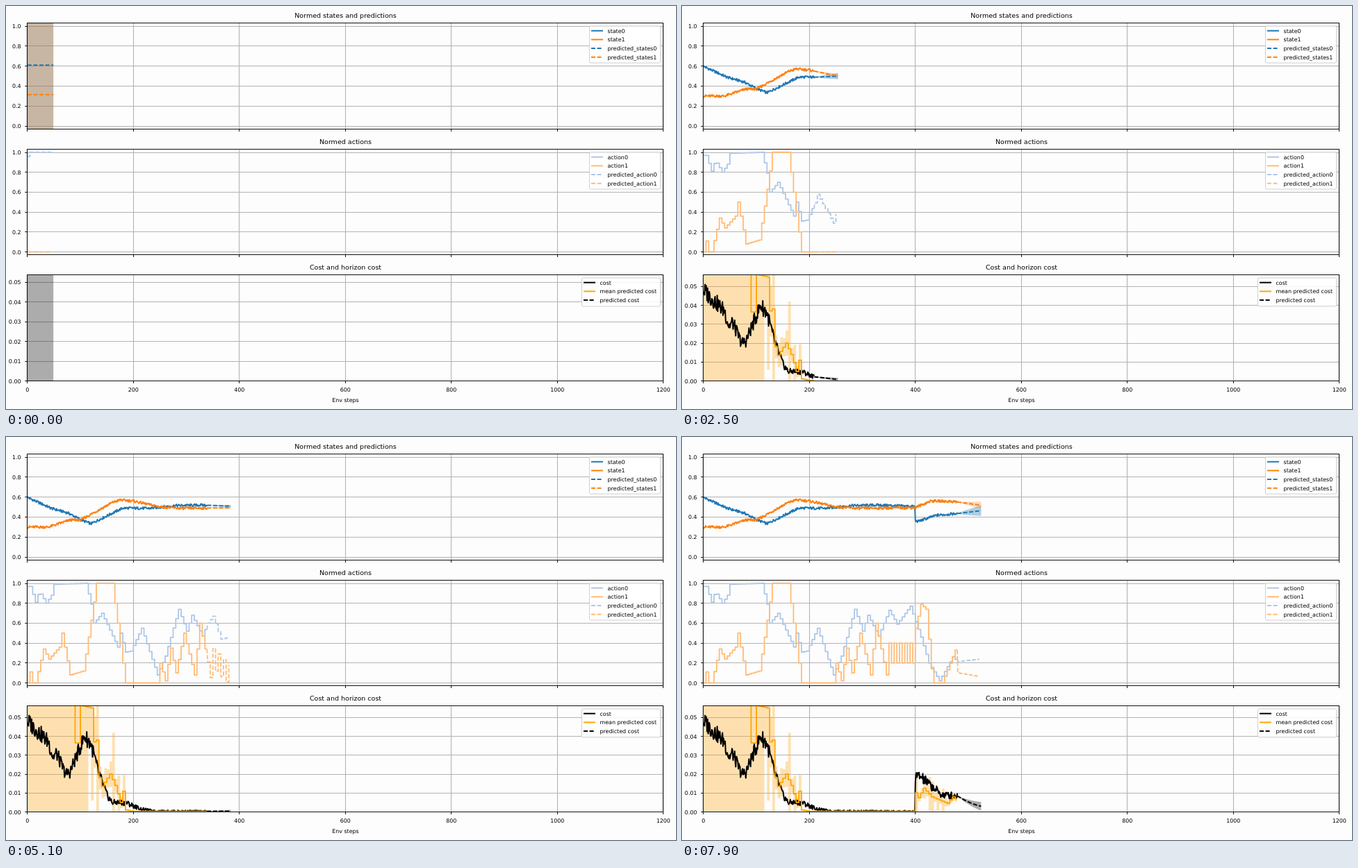
An HTML page with a canvas for the animation above (8000 ms loop, 964 by 581 pixels).

```html
<!DOCTYPE html>
<html lang="en">
<head>
<meta charset="utf-8">
<title>Control run</title>
<style>
html, body { margin: 0; width: 100%; height: 100%; overflow: hidden; background: #fdfdfd; }
canvas { display: block; }
</style>
</head>
<body>
<canvas id="c" width="964" height="581"></canvas>
<script>
const ctx = document.getElementById('c').getContext('2d');
const FONT = '"DejaVu Sans", sans-serif';
const LEFT = 30.8, RIGHT = 945.8, HORIZON = 45, HOLD = 5, KICK = 400;
const BLUE = '#1f77b4', ORANGE = '#ff7f0e', PALE_BLUE = '#aec7e8', PALE_ORANGE = '#ffbb78',
      GOLD = '#ffa500', BLACK = '#000', GRID = '#b3b3b3', SPINE = '#111';
const BLUE_BAND = 'rgba(31,119,180,.35)', ORANGE_BAND = 'rgba(255,127,14,.3)',
      GRAY_BAND = 'rgba(0,0,0,.32)', GOLD_BAND = 'rgba(255,165,20,.33)';
const DASH = [6, 2.6];

// Key points: env step, value
const state0 = [[0, .597], [45, .488], [77, .44], [100, .375], [120, .333], [180, .49],
  [230, .487], [280, .515], [330, .52], [399, .506], [400, .36], [406, .358], [440, .418], [525, .455]];
const state1 = [[0, .3], [40, .3], [80, .37], [100, .37], [160, .545], [175, .572], [200, .56],
  [250, .502], [290, .487], [399, .494], [430, .562], [475, .555], [525, .505]];
const cost = [[0, .048], [40, .037], [48, .029], [55, .031], [72, .02], [80, .021], [108, .04],
  [120, .036], [134, .021], [150, .009], [160, .005], [185, .005], [215, .0015], [240, .0005],
  [399, .0003], [400, .0185], [408, .019], [435, .0125], [450, .009], [480, .0085], [525, .0005]];
const meanCost = [[0, .08], [85, .08], [90, .0365], [95, .0365], [100, .08], [105, .056],
  [120, .055], [125, .037], [130, .038], [135, .018], [140, .0135], [155, .02], [165, .014],
  [175, .005], [180, .011], [185, .001], [200, .0003], [399, .0003], [400, .01], [405, .0075],
  [415, .0125], [430, .008], [460, .0045], [470, .008], [480, .006]];
const action0 = [[0, .97], [5, .97], [15, .81], [22, .92], [35, .8], [45, .88], [50, .99],
  [110, 1], [120, .79], [125, .6], [140, .7], [170, .36], [175, .5], [185, .31], [195, .32],
  [215, .55], [245, .08], [260, .27], [285, .74], [300, .52], [310, .68], [330, .47],
  [350, .73], [365, .59], [390, .77], [410, .46], [425, .2], [445, .02], [470, .26], [525, .01]];
const action1 = [[0, 0], [5, .11], [10, 0], [15, 0], [30, .34], [40, .24], [60, .36], [65, .5],
  [80, .08], [105, .12], [120, .63], [130, 1], [160, 1], [185, 0], [245, 0], [250, .2],
  [260, .02], [270, .35], [280, .1], [295, .5], [315, .08], [325, .6], [345, .08],
  ...Array.from({ length: 10 }, (_, i) => [350 + HOLD * i, i % 2 ? .2 : .4]),
  [400, .55], [410, .79], [420, .74], [430, .14], [435, 0], [450, 0], [475, .33], [480, .1], [525, .26]];

// How far a doubtful model strays, before and after the kick
const early = { state0: -.42, state1: -.23, cost: .14, sag: 0, spread: .06, action0: -.65 };
const late = { state0: .113, state1: .145, cost: .028, sag: .032, spread: .018, action0: -.33 };

const px = s => LEFT + s * (RIGHT - LEFT) / 1200;
const yState = v => 173 - v * 144;
const yAction = v => 354.5 - v * 143.5;
let costScale = 2725;
const yCost = v => 540.5 - v * costScale;
const snap = v => Math.floor(v) + .5;
const clamp = v => Math.min(1, Math.max(0, v));

function random(i, seed) {
  const r = Math.sin(i * 12.9898 + seed * 78.233) * 43758.5453;
  return r - Math.floor(r);
}
const noise = (i, seed) => random(i, seed) * 2 - 1;

function at(track, s) {
  let i = 0;
  while (i < track.length - 2 && track[i + 1][0] <= s) i++;
  const [[s0, v0], [s1, v1]] = track.slice(i, i + 2);
  return v0 + (v1 - v0) * clamp((s - s0) / (s1 - s0));
}
// The kick cannot be foreseen
const ahead = (track, n, s) => at(track, n < KICK ? Math.min(s, KICK - 1) : s);

function doubt(n) {
  const age = n - (n < KICK ? 84 : KICK);
  return Math.exp(-((age / 50) ** 2));
}

const noisyState = (track, seed) => i => at(track, i) + noise(i, seed) * .013;
const noisyCost = i => Math.max(0, at(cost, i) + noise(i, 3) * .022 * Math.sqrt(at(cost, i)));
const held = track => k => at(track, k * HOLD);
const meanSpread = k =>
  k < 22 ? 1 : held(meanCost)(k) * (.25 + 1.3 * random(k, 4) ** 3);

function trace(points) {
  ctx.beginPath();
  points.forEach(([x, y]) => ctx.lineTo(x, y));
}
function line(points, color, width, dash = []) {
  trace(points);
  ctx.strokeStyle = color;
  ctx.lineWidth = width;
  ctx.setLineDash(dash);
  ctx.stroke();
  ctx.setLineDash([]);
}
function fill(points, color) {
  trace(points);
  ctx.fillStyle = color;
  ctx.fill();
}
function text(str, x, y, size = 7.93, align = 'left') {
  ctx.font = size + 'px ' + FONT;
  ctx.textAlign = align;
  ctx.fillStyle = BLACK;
  ctx.fillText(str, x, y);
}

function series(fn, n, toY) {
  return Array.from({ length: n + 1 }, (_, i) => [px(i), toY(fn(i))]);
}
function stairs(fn, from, to, toY) {
  const pts = [];
  for (let k = Math.floor(from / HOLD); k * HOLD <= to; k++) {
    const y = toY(fn(k));
    pts.push([px(Math.max(from, k * HOLD)), y], [px(Math.min((k + 1) * HOLD, to)), y]);
  }
  return pts;
}

// Fills the band at once and returns the dashed mean for later
function forecast(track, n, drift, sag, spread, toY) {
  const mean = [], up = [], down = [];
  const a = at(track, n), b = ahead(track, n, n + HORIZON) + drift;
  for (let i = 0; i <= 30; i++) {
    const u = i / 30, x = px(n + HORIZON * u);
    const v = a + (b - a) * u - sag * u * (1 - u), d = spread * u ** .8;
    mean.push([x, toY(v)]);
    up.push([x, toY(v + d)]);
    down.unshift([x, toY(Math.max(0, v - d))]);
  }
  return { mean, band: up.concat(down) };
}

function panel(title, top, bottom, ticks, toY, digits, draw) {
  const edge = [[LEFT, top], [RIGHT, top], [RIGHT, bottom], [LEFT, bottom]];
  const cols = Array.from({ length: 7 }, (_, i) => snap(px(i * 200)));
  text(title, 488.5, top - 8, 9.52, 'center');
  ctx.save();
  trace(edge);
  ctx.clip();
  cols.forEach(x => line([[x, top], [x, bottom]], GRID, 1.1));
  ticks.forEach(v => line([[LEFT, snap(toY(v))], [RIGHT, snap(toY(v))]], GRID, 1.1));
  draw();
  ctx.restore();
  ctx.strokeStyle = SPINE;
  ctx.lineWidth = 1.1;
  ctx.strokeRect(snap(LEFT), top, snap(RIGHT) - snap(LEFT), bottom - top);
  cols.forEach(x => line([[x, bottom], [x, bottom + 3.5]], SPINE, 1));
  ticks.forEach(v => {
    const y = snap(toY(v));
    line([[LEFT - 3.5, y], [LEFT, y]], SPINE, 1);
    text(v.toFixed(digits), 21.5, toY(v) + 3, 7.93, 'right');
  });
}

function legend(x, y, h, items) {
  ctx.beginPath();
  ctx.roundRect(x, y, 941.5 - x, h, 2);
  ctx.fillStyle = 'rgba(255,255,255,.85)';
  ctx.fill();
  ctx.strokeStyle = '#d0d0d4';
  ctx.lineWidth = 1;
  ctx.stroke();
  items.forEach(([label, color, dash], i) => {
    const ly = y + 6.7 + i * 12.7;
    line([[x + 2.5, ly], [x + 19.5, ly]], color, 2, dash ? DASH : []);
    text(label, x + 26, ly + 2.8);
  });
}

function unsure(top, bottom, color) {
  const x = px(49);
  fill([[LEFT, top], [x, top], [x, bottom], [LEFT, bottom]], color);
}

function drawStates(n, plan, d) {
  const rows = [
    [state0, BLUE, BLUE_BAND, .61, plan.state0, .068],
    [state1, ORANGE, ORANGE_BAND, .315, plan.state1, .035]];
  if (!n) {
    rows.forEach(([, , band]) => unsure(20, 180, band));
    rows.forEach(([, color, , v]) =>
      line([[LEFT, yState(v)], [px(49), yState(v)]], color, 2, DASH));
    return;
  }
  const paths = rows.map(([track, , , , pull, wide]) =>
    forecast(track, n, pull * d, 0, .012 + wide * d ** .2, yState));
  paths.forEach((p, i) => fill(p.band, rows[i][2]));
  rows.forEach(([track, color], i) => {
    line(series(noisyState(track, i + 1), n, yState), color, 2);
    line(paths[i].mean, color, 2, DASH);
  });
}

function drawActions(n, tick, plan, d) {
  const ripple = .24 * Math.cos((tick - 25) * Math.PI / 26);
  const rows = [
    [action0, PALE_BLUE, ripple + plan.action0 * d],
    [action1, PALE_ORANGE, .5 * d - .22]];
  rows.forEach(([track, color, drift], which) => {
    if (!n) {
      const guess = k => which ? 0 : 1 - .04 * Math.round(random(k, 9) * .7);
      line(stairs(guess, 0, 45, yAction), color, 1.8, DASH);
      return;
    }
    const first = Math.floor(n / HOLD) + 1;
    const planned = k =>
      clamp(ahead(track, n, k * HOLD) + drift * (k - first) / 8);
    const past = stairs(held(track), 0, n, yAction);
    line(past, color, 1.8);
    line([past[past.length - 1], ...stairs(planned, n + 1, n + 41, yAction)], color, 1.8, DASH);
  });
}

function drawCost(n, plan, d) {
  if (!n) return unsure(380, 545, GRAY_BAND);
  const mean = held(meanCost);
  const high = stairs(k => mean(k) + meanSpread(k), 0, n, yCost);
  const low = stairs(k => Math.max(0, mean(k) - meanSpread(k)), 0, n, yCost);
  fill(high.concat(low.reverse()), GOLD_BAND);
  const path = forecast(cost, n, plan.cost * d, plan.sag * d, plan.spread * d + .0008, yCost);
  fill(path.band, GRAY_BAND);
  line(series(noisyCost, n, yCost), BLACK, 2);
  line(stairs(mean, 0, n, yCost), GOLD, 1.8);
  line(path.mean, BLACK, 2, DASH);
}

function render(tick) {
  const n = tick ? 84 + HOLD * tick : 0;
  const plan = n < KICK ? early : late, d = doubt(n);
  costScale = tick ? 2725 : 2845;
  ctx.fillStyle = '#fdfdfd';
  ctx.fillRect(0, 0, 964, 581);
  ctx.lineJoin = 'round';

  const fifths = [0, .2, .4, .6, .8, 1];
  panel('Normed states and predictions', 24.5, 177.5, fifths, yState, 1,
    () => drawStates(n, plan, d));
  panel('Normed actions', 206.5, 358.5, fifths, yAction, 1,
    () => drawActions(n, tick, plan, d));
  panel('Cost and horizon cost', 387.5, 540.5, fifths.map(v => v / 20), yCost, 2,
    () => drawCost(n, plan, d));

  legend(839.5, 29, 53, [['state0', BLUE], ['state1', ORANGE],
    ['predicted_states0', BLUE, true], ['predicted_states1', ORANGE, true]]);
  legend(839.5, 211, 53, [['action0', PALE_BLUE], ['action1', PALE_ORANGE],
    ['predicted_action0', PALE_BLUE, true], ['predicted_action1', PALE_ORANGE, true]]);
  legend(828.5, 392, 41, [['cost', BLACK], ['mean predicted cost', GOLD],
    ['predicted cost', BLACK, true]]);

  for (let s = 0; s <= 1200; s += 200) text(String(s), px(s), 556, 7.93, 'center');
  text('Env steps', 488.5, 570.5, 7.93, 'center');
}

const begin = performance.now();
function loop() {
  render(Math.floor((performance.now() - begin) / 100) % 80);
  requestAnimationFrame(loop);
}
loop();
</script>
</body>
</html>
```
